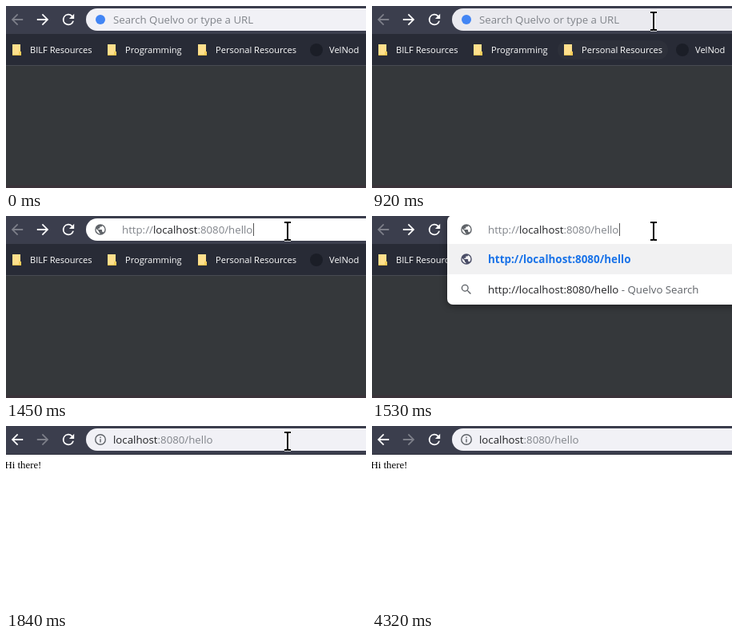
An HTML page for the animation above (5.33 s loop, 450 by 228 pixels).

```html
<!DOCTYPE html>
<html lang="en">
<head>
<meta charset="utf-8">
<title>Hello page</title>
<style>
  html, body { margin: 0; width: 100%; height: 100%; overflow: hidden; background: #35383b; }
  svg { display: block; width: 450px; height: 228px; }
  text { font-family: "Open Sans", "Noto Sans", sans-serif; font-size: 13.25px; fill: #202124; }
  .mark { font-size: 11.1px; fill: #fff; }
  .page { font: 12.8px "Liberation Serif", Times, serif; fill: #000; }
  .soft { fill: #80848a; }
  .match { font-weight: 700; font-size: 13.45px; fill: #1a73e8; }
  .note { fill: #5f6368; }
  .popup { filter: drop-shadow(0 2px 4px rgba(0, 0, 0, .4)); }
</style>
</head>
<body>
<svg viewBox="0 0 450 228">
  <defs>
    <path id="back" d="M20 11H7.8l5.6-5.6L12 4l-8 8 8 8 1.4-1.4L7.8 13H20z"/>
    <path id="reload" d="M17.65 6.35A8 8 0 1 0 19.73 14h-2.08A6 6 0 1 1 12 6c1.66 0 3.14.69 4.22 1.78L13 11h7V4z"/>
    <path id="close" d="M19 6.4 17.6 5 12 10.6 6.4 5 5 6.4l5.6 5.6L5 17.6 6.4 19l5.6-5.6 5.6 5.6 1.4-1.4-5.6-5.6z"/>
    <g id="info">
      <circle cx="12" cy="12" r="9" fill="none" stroke="#5f6368" stroke-width="2"/>
      <path d="M11 7h2v2h-2zM11 11h2v6h-2z" fill="#5f6368"/>
    </g>
    <path id="globe" d="M12 2a10 10 0 1 0 0 20 10 10 0 0 0 0-20zm-1 17.93A8 8 0 0 1 4.2 10.2L9 15v1a2 2 0 0 0 2 2zm6.9-2.54A2 2 0 0 0 16 16h-1v-3a1 1 0 0 0-1-1H8v-2h2a1 1 0 0 0 1-1V7h2a2 2 0 0 0 2-2v-.4a8 8 0 0 1 2.9 12.8z"/>
    <path id="search" d="M15.5 14h-.8l-.3-.3a6.5 6.5 0 1 0-.7.7l.3.3v.8l5 5 1.5-1.5zm-6 0a4.5 4.5 0 1 1 0-9 4.5 4.5 0 0 1 0 9z"/>
    <g id="folder">
      <path d="M0 0h10v9h1v5H0z" fill="#ffe08c"/>
      <path d="M8 9h3v5H8z" fill="#f7cf5c"/>
      <path d="M0 13h11v1H0z" fill="#eebf4a"/>
    </g>
  </defs>

  <!-- empty tab with bookmarks -->
  <g data-t="0-1840">
    <rect width="450" height="228" fill="#35383b"/>
    <rect y="224.5" width="450" height="4" fill="#3a3239"/>
    <rect y="34" width="450" height="41" fill="#282b36"/>
    <rect y="74" width="450" height="1" fill="#484b52"/>
    <rect data-t="750-1380" x="232" y="43" width="138" height="24" rx="12" fill="#2d303a"/>
    <use href="#folder" x="8" y="48"/>
    <use href="#folder" x="127" y="48"/>
    <use href="#folder" x="240" y="48"/>
    <circle cx="388" cy="55" r="8" fill="#1b1e27"/>
    <text class="mark" x="30" y="59">BILF Resources</text>
    <text class="mark" x="149" y="59">Programming</text>
    <text class="mark" x="262" y="59">Personal Resources</text>
    <text class="mark" x="404" y="59">VelNod</text>
  </g>

  <!-- loaded page -->
  <g data-t="1840-5330">
    <rect y="34" width="450" height="194" fill="#fff"/>
    <rect y="34" width="450" height="2" fill="#2d303c"/>
    <text class="page" x="-1.5" y="53">Hi there!</text>
  </g>

  <!-- toolbar -->
  <rect width="450" height="35" fill="#3b3e4d"/>
  <use id="prev" href="#back" transform="translate(14 17) scale(.9) translate(-12 -12)"/>
  <use id="next" href="#back" transform="translate(46 17) scale(-.9 .9) translate(-12 -12)"/>
  <g fill="#fff">
    <use data-t="0-1760 1840-5330" href="#reload" transform="translate(78 17) scale(.9) translate(-12 -12)"/>
    <use data-t="1760-1840" href="#close" transform="translate(78 17) scale(.78) translate(-12 -12)"/>
  </g>

  <!-- suggestions -->
  <g data-t="1530-1840">
    <rect class="popup" x="94" y="-1" width="370" height="112" rx="7" fill="#fff"/>
    <rect x="94" y="35" width="356" height="38" fill="#f1f1f2"/>
    <use href="#globe" fill="#4a4d66" transform="translate(118 54) scale(.68) translate(-12 -12)"/>
    <use href="#search" fill="#5f6368" transform="translate(118 92) scale(.7) translate(-12 -12)"/>
    <text class="match" x="145" y="59">http://localhost:8080/hello</text>
    <text x="145" y="97">http://localhost:8080/hello<tspan class="note"> - Quelvo Search</tspan></text>
  </g>

  <!-- address field -->
  <rect id="field" x="100" y="3" width="380" height="28" rx="14"/>
  <g data-t="0-1380">
    <circle cx="118" cy="17" r="6" fill="#4285f4"/>
    <text class="soft" x="134" y="22">Search Quelvo or type a URL</text>
    <rect data-t="1150-1380" x="133" y="9" width="1" height="16" fill="#333"/>
  </g>
  <g data-t="1380-1760">
    <use href="#globe" fill="#5f6368" transform="translate(118 17) scale(.68) translate(-12 -12)"/>
    <g id="typed">
      <text class="soft" x="145" y="22">http://<tspan fill="#202124">localhost</tspan>:8080/hello</text>
      <rect x="309" y="9" width="1" height="16" fill="#555"/>
    </g>
  </g>
  <g data-t="1760-5330">
    <use href="#info" transform="translate(118 17) scale(.7) translate(-12 -12)"/>
    <text x="134" y="22">localhost<tspan class="soft">:8080/hello</tspan></text>
  </g>

  <!-- pointers -->
  <path id="arrow" d="M.5.5V24l5.5-5 4.3 10.2 3.8-1.7L10 18h7z" stroke="#fff"/>
  <g id="beam" fill="none">
    <path d="M-4-11h3l1 1 1-1h3M0-10V10M-4 11h3l1-1 1 1h3" stroke="#fff" stroke-width="3.4"/>
    <path d="M-4-11h3l1 1 1-1h3M0-10V10M-4 11h3l1-1 1 1h3" stroke="#000" stroke-width="2"/>
  </g>
</svg>
<script>
const LOOP = 5330;
const $ = id => document.getElementById(id);
const timed = [...document.querySelectorAll('[data-t]')].map(el => ({
  el, spans: el.dataset.t.split(' ').map(s => s.split('-').map(Number))
}));

const show = (el, on) => el.setAttribute('display', on ? 'inline' : 'none');

// Position along a straight path that advances in n held steps.
function glide(t, start, end, n, [x0, y0], [x1, y1]) {
  const step = (end - start) / (n - 1);
  const p = Math.min(n - 1, Math.floor((t - start) / step + 0.01)) / (n - 1);
  return [Math.round(x0 + (x1 - x0) * p), Math.round(y0 + (y1 - y0) * p)];
}

function arrowAt(t) {
  if (t < 150) return null;
  if (t < 750) return glide(t, 150, 670, 8, [250, 138], [330, 47]);
  if (t < 835) return [339, 36];
  if (t < 3710) return null;
  if (t < 4250) return glide(t, 3710, 4160, 7, [352, 32], [428, 205]);
  return t < 4320 ? [428, 214] : null;
}

function beamAt(t) {
  if (t < 835 || t >= 3710) return null;
  return t < 920 ? [351, 22] : [352, 19];
}

function place(el, pos) {
  show(el, pos);
  if (pos) el.setAttribute('transform', `translate(${pos})`);
}

function fieldColor(t) {
  if (t < 835) return '#f1f1f6';
  if (t < 920) return '#eeeef3';
  if (t < 1150) return '#eaeaef';
  if (t < 1760) return '#fff';
  return t < 1840 ? '#f1f3f4' : '#f1f1f6';
}

function draw(t) {
  for (const { el, spans } of timed) show(el, spans.some(([a, b]) => t >= a && t < b));
  const loaded = t >= 1840;
  $('prev').setAttribute('fill', loaded ? '#fff' : '#7d7f89');
  $('next').setAttribute('fill', loaded ? '#7d7f89' : '#fff');
  $('field').setAttribute('fill', fieldColor(t));
  $('typed').setAttribute('transform', `translate(${t < 1450 ? -11 : 0} 0)`);
  place($('arrow'), arrowAt(t));
  place($('beam'), beamAt(t));
}

const begin = performance.now();
function tick() {
  draw((performance.now() - begin) % LOOP);
  requestAnimationFrame(tick);
}
tick();
</script>
</body>
</html>
```
